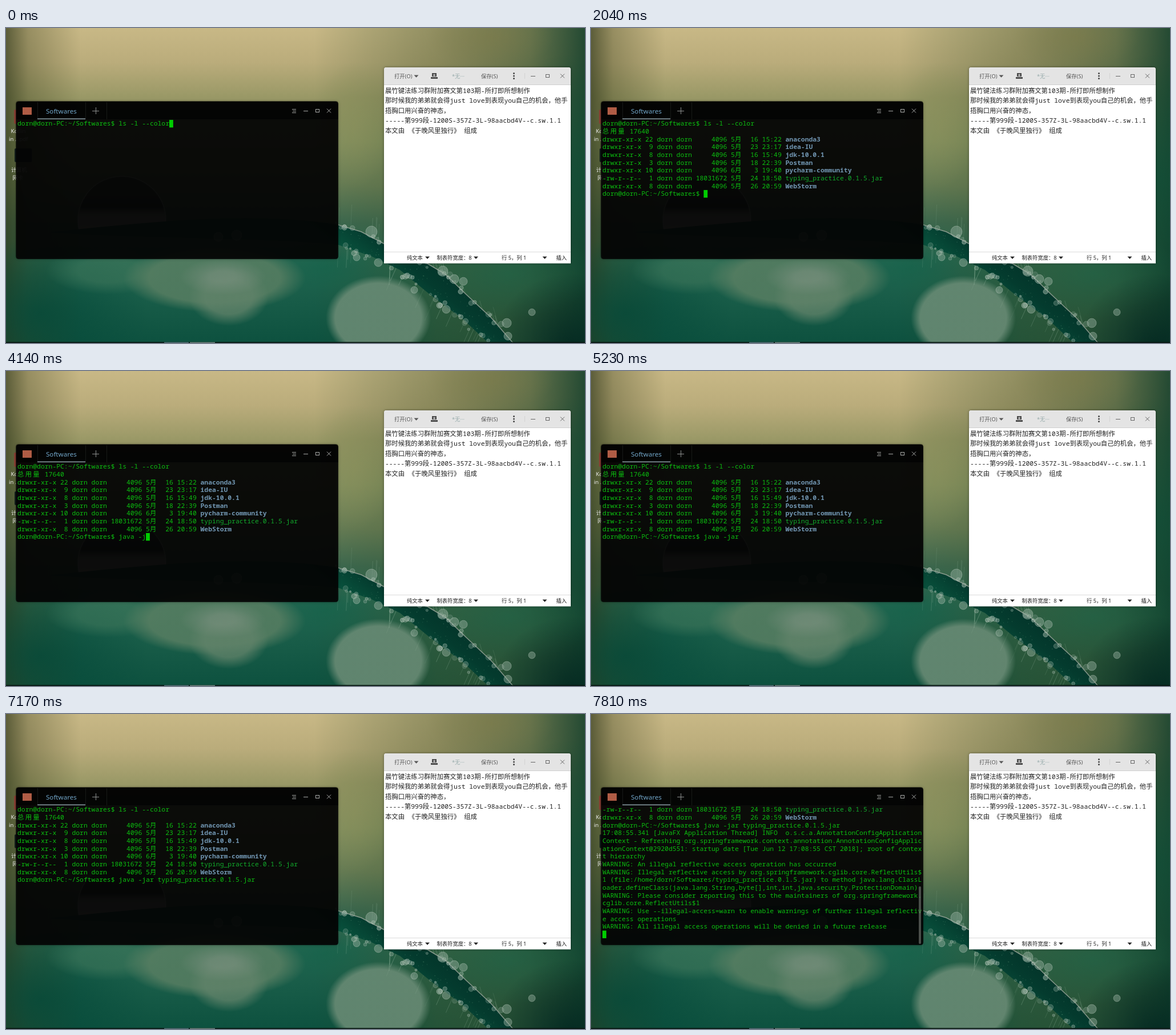
Animation of 1014 by 552 pixels, one loop 8 s. Source, as an HTML page with a canvas:

```html
<!DOCTYPE html>
<html lang="zh">
<head>
<meta charset="utf-8">
<title>Terminal session</title>
<style>
html, body { margin: 0; width: 100%; height: 100%; overflow: hidden; background: #0d503e; }
canvas { display: block; }
</style>
</head>
<body>
<canvas id="stage" width="1014" height="552"></canvas>
<script>
const W = 1014, H = 552, LOOP = 8000;
const MONO = '"Noto Sans Mono", "Noto Sans Mono CJK SC", "Noto Sans CJK SC", monospace';
const SANS = '"Noto Sans", "Noto Sans CJK SC", sans-serif';
const ctx = document.getElementById('stage').getContext('2d');
const desk = document.createElement('canvas');
desk.width = W;
desk.height = H;
const d = desk.getContext('2d');

let seed = 7;
const rnd = (a = 0, b = 1) => {
  seed = (seed * 16807) % 2147483647;
  return a + (b - a) * seed / 2147483647;
};

function ramp(x0, y0, x1, y1, stops) {
  const g = d.createLinearGradient(x0, y0, x1, y1);
  stops.forEach(([at, color]) => g.addColorStop(at, color));
  return g;
}

function rect(color, x, y, w, h) {
  d.fillStyle = color;
  d.fillRect(x, y, w, h);
}

function panel(color, x, y, w, h, radii) {
  d.fillStyle = color;
  d.beginPath();
  d.roundRect(x, y, w, h, radii);
  d.fill();
}

function line(color, width, ...p) {
  d.strokeStyle = color;
  d.lineWidth = width;
  d.beginPath();
  for (let i = 0; i < p.length; i += 4) {
    d.moveTo(p[i], p[i + 1]);
    d.lineTo(p[i + 2], p[i + 3]);
  }
  d.stroke();
}

function label(text, x, y, size, color, family = SANS, weight = 400) {
  d.font = `${weight} ${size}px ${family}`;
  d.fillStyle = color;
  d.fillText(text, x, y);
}

// Soft ellipse: solid up to `core`, then fading out
function glow(x, y, rx, ry, rgb, alpha, core = 0) {
  d.save();
  d.translate(x, y);
  d.scale(rx, ry);
  const g = d.createRadialGradient(0, 0, core, 0, 0, 1);
  g.addColorStop(0, `rgba(${rgb},${alpha})`);
  g.addColorStop(1, `rgba(${rgb},0)`);
  d.fillStyle = g;
  d.fillRect(-1, -1, 2, 2);
  d.restore();
}

// Point at fraction t of a chain of points
function along(points, t) {
  const s = t * (points.length - 1), i = Math.min(points.length - 2, Math.floor(s)), f = s - i;
  return [0, 1].map(k => points[i][k] + (points[i + 1][k] - points[i][k]) * f);
}

function bead(x, y, r, alpha) {
  d.beginPath();
  d.arc(x, y, r, 0, 7);
  d.fillStyle = `rgba(150,175,160,${alpha})`;
  d.fill();
  d.strokeStyle = `rgba(205,215,205,${alpha})`;
  d.lineWidth = 0.8;
  d.stroke();
}

function drawLeaf() {
  const top = [[582, 345], [622, 357], [662, 378], [735, 411], [770, 432], [805, 466], [850, 508], [888, 552]];
  const low = [[582, 380], [640, 400], [690, 424], [740, 465], [800, 510], [845, 552]];

  // Large drop resting on the stem
  d.beginPath();
  d.arc(203, 337, 77, Math.PI * 0.93, Math.PI * 2.07);
  d.fillStyle = ramp(0, 260, 0, 350, [[0, '#3a4837'], [0.6, '#26362a'], [0.75, '#93a092'], [1, '#a9a8a5']]);
  d.fill();
  d.strokeStyle = 'rgba(190,205,195,.55)';
  d.lineWidth = 2;
  d.stroke();

  for (let i = 0; i < 46; i++) {
    const upper = i % 2, [x, y] = along(upper ? top : low, rnd());
    const len = rnd(12, 42), dir = upper ? -1 : 1;
    line(`rgba(190,215,195,${rnd(0.08, 0.32)})`, 0.8, x, y,
      x - dir * len * (x < 680 ? 0.04 : upper ? -0.3 : 0.45), y + dir * len);
  }

  d.beginPath();
  d.moveTo(75, 358);
  d.bezierCurveTo(250, 340, 430, 320, 582, 345);
  top.forEach(p => d.lineTo(...p));
  low.slice().reverse().forEach(p => d.lineTo(...p));
  d.bezierCurveTo(450, 366, 240, 370, 75, 358);
  d.fillStyle = ramp(580, 400, 660, 300, [[0, '#0a5a42'], [0.5, '#043b2e'], [1, '#022f26']]);
  d.fill();

  for (let i = 0; i < 90; i++) {
    const t = rnd(), a = along(top, t), b = along(low, t), f = rnd();
    rect(`rgba(95,150,120,${rnd(0.1, 0.45)})`, a[0] + (b[0] - a[0]) * f, a[1] + (b[1] - a[1]) * f, 1.3, 1.3);
  }
  d.strokeStyle = 'rgba(190,190,180,.65)';
  d.lineWidth = 1.6;
  d.beginPath();
  top.forEach(p => d.lineTo(...p));
  d.stroke();
  for (let i = 0; i < 64; i++) {
    const [x, y] = along(i % 2 ? top : low, rnd());
    bead(x + rnd(-6, 6), y + rnd(-5, 6), rnd(1, 5), rnd(0.2, 0.6));
  }
  for (const [x, y, r] of [[640, 357, 10], [765, 426, 9], [785, 440, 8], [801, 444, 7], [877, 517, 8],
    [879, 540, 7], [921, 498, 6], [771, 493, 7], [715, 459, 6], [652, 411, 7], [614, 402, 6], [372, 366, 8], [404, 363, 9]])
    bead(x, y, r, 0.45);
}

function drawWallpaper() {
  rect(ramp(0, 0, 0, H, [[0, '#c8b886'], [0.11, '#baac7b'], [0.22, '#999866'], [0.36, '#889462'],
    [0.5, '#6a7f57'], [0.62, '#3c6950'], [0.74, '#226650'], [1, '#0d513f']]), 0, 0, W, H);
  rect(ramp(0, 0, 130, 0, [[0, 'rgba(50,58,28,.72)'], [0.3, 'rgba(60,65,30,.35)'], [1, 'rgba(60,65,30,0)']]), 0, 0, 130, H);
  rect(ramp(540, 0, W, 0, [[0, 'rgba(45,75,40,0)'], [0.45, 'rgba(70,85,45,.42)'], [0.8, 'rgba(50,80,48,.68)'],
    [1, 'rgba(18,62,42,.9)']]), 540, 0, W - 540, H);
  glow(985, 265, 150, 220, '14,78,56', 0.75);
  glow(850, 15, 110, 60, '125,122,72', 0.5);
  glow(610, 170, 70, 110, '140,145,92', 0.55);
  glow(60, 500, 190, 130, '4,72,56', 0.75);
  glow(560, 420, 90, 50, '20,98,74', 0.6);
  glow(180, 425, 110, 42, '62,118,90', 0.6, 0.5);
  glow(365, 438, 160, 60, '88,126,98', 0.85, 0.72);
  glow(390, 470, 70, 52, '96,130,105', 0.8, 0.6);
  glow(380, 436, 75, 32, '118,142,124', 0.65, 0.3);
  glow(652, 508, 92, 74, '104,138,116', 0.9, 0.82);
  glow(880, 430, 150, 80, '28,104,76', 0.5);
  glow(990, 560, 140, 130, '2,38,32', 0.85);
  drawLeaf();

  panel('#8a4034', 14, 143, 30, 25, 2);
  label('Kotlin', 8.5, 184, 9.5, '#eee');
  label('in ...pdf', 5, 197.5, 9.5, '#eee');
  panel('#14201c', 15, 211, 30, 24, 2);
  label('计算机', 9, 252, 9.3, '#eee');
  label('网卡', 11.5, 265.5, 9.3, '#eee');
  rect('rgba(8,22,18,.85)', 0, 550, W, 2);
  rect('#53757a', 277, 550.5, 43, 1.5);
  rect('#6d8580', 322, 550.5, 44, 1.5);
}

function windowButtons(color, min, max, close, y) {
  line(color, 1, min, y + 0.5, min + 8, y + 0.5, close, y - 3.5, close + 7, y + 3.5, close, y + 3.5, close + 7, y - 3.5);
  d.strokeRect(max + 0.5, y - 2.5, 6, 5);
}

function drawTerminal() {
  d.save();
  d.shadowColor = 'rgba(0,0,0,.4)';
  d.shadowBlur = 5;
  panel('rgba(4,4,4,.91)', 18, 129, 563.5, 275.5, 4);
  d.restore();
  panel('rgba(0,0,0,.6)', 18, 129, 563.5, 31, [4, 4, 0, 0]);
  d.strokeStyle = 'rgba(0,0,0,.55)';
  d.lineWidth = 1;
  d.beginPath();
  d.roundRect(17.5, 128.5, 564, 276, 4);
  d.stroke();
  rect('#b05c45', 29, 139, 16, 13);
  line('rgba(70,75,72,.3)', 1, 55.5, 130, 55.5, 160, 139.5, 130, 139.5, 160, 176.5, 130, 176.5, 160);
  label('Softwares', 70, 150, 11.6, '#72a7ca');
  rect('#8a9ca4', 55, 158.5, 84, 1.5);
  line('#8d908e', 1, 151, 145.5, 163, 145.5, 157.5, 139, 157.5, 151);
  line('#a9aaa8', 1, 501, 142.5, 508, 142.5, 502, 145.5, 508, 145.5, 501, 148.5, 508, 148.5);
  windowButtons('#a9aaa8', 521, 542, 562, 145);
}

function arrow(x, y, color) {
  d.fillStyle = color;
  d.beginPath();
  d.moveTo(x - 4, y - 2);
  d.lineTo(x + 4, y - 2);
  d.lineTo(x, y + 2.3);
  d.fill();
}

function drawEditor() {
  d.save();
  d.shadowColor = 'rgba(0,0,0,.4)';
  d.shadowBlur = 4;
  panel('#fff', 662, 69, 327, 343.5, [4, 4, 0, 0]);
  d.restore();
  panel('#e4e4e4', 662, 69, 327, 30.5, [4, 4, 0, 0]);
  rect('#cfcfcf', 662, 99, 327, 1);
  rect('#dadada', 662, 392, 327, 1);

  label('打开(O)', 680, 87.5, 9.3, '#555');
  arrow(718.5, 84.5, '#555');
  rect('#4b4b4b', 744, 86, 12, 3);
  rect('#4b4b4b', 746, 79, 8, 6);
  line('#e4e4e4', 1, 750, 80.5, 750, 85, 748, 82.5, 752, 82.5);
  label('*无···', 781, 87.5, 9.3, '#96aaaa');
  label('保存(S)', 832, 87.5, 9.3, '#555');
  for (const y of [79.5, 84, 88.5]) {
    d.fillStyle = '#444';
    d.beginPath();
    d.arc(889.5, y, 1.5, 0, 7);
    d.fill();
  }
  line('#d2d2d2', 1, 908.5, 79, 908.5, 89);
  windowButtons('#666', 919, 945, 971, 84);

  ['小满键法练习群附加赛文第103期-所打即所想制作'.replace('小满键法', '晨竹键法'),
    '那时候我的弟弟就会得just love到表现you自己的机会，他手',
    '捂胸口用兴奋的神态，',
    '-----第999段-1200S-357Z-3L-98aacbd4V--c.sw.1.1',
    '本文由 《于晚风里独行》 组成'
  ].forEach((text, i) => label(text, 664, 114 + i * 17.45, 11.34, '#222', MONO));

  label('纯文本', 702, 405.5, 9.3, '#222');
  arrow(738, 402.5, '#222');
  label('制表符宽度：8', 754.5, 405.5, 9.3, '#222');
  arrow(823, 402.5, '#222');
  label('行 5，列 1', 868, 405.5, 9.3, '#222');
  arrow(943.5, 402.5, '#222');
  label('插入', 963.5, 405.5, 9.3, '#111', SANS, 500);
}

// Terminal contents
const CELL = 6.82, ROW = 13.66, LEFT = 20, TOP = 161, COLS = 82, ROWS = 17;
const USER = 'dorn', JAR = 'typing_practice.0.1.5.jar';
const PROMPT = `${USER}@${USER}-PC:~/Softwares$ `;

const entry = (mode, links, size, month, day, time, name) =>
  `${mode} ${String(links).padStart(2)} ${USER} ${USER} ${String(size).padStart(8)} ${month}月  ${String(day).padStart(2)} ${time} ${name}`;
const folder = (links, ...rest) => entry('drwxr-xr-x', links, 4096, ...rest);

const listCommand = PROMPT + 'ls -l --color';
const listed = [
  listCommand,
  '总用量 17640',
  folder(22, 5, 16, '15:22', 'anaconda3'),
  folder(9, 5, 23, '23:17', 'idea-IU'),
  folder(8, 5, 16, '15:49', 'jdk-10.0.1'),
  folder(3, 5, 18, '22:39', 'Postman'),
  folder(10, 6, 3, '19:40', 'pycharm-community'),
  entry('-rw-r--r--', 1, 18031672, 5, 24, '18:50', JAR),
  folder(8, 5, 26, '20:59', 'WebStorm'),
  PROMPT
].join('\n');
const typed = n => listed + 'java -jar t'.slice(0, n);
const run = `${listed}java -jar ${JAR} `;
const started = `${run}\n17:08:55.341 [JavaFX Application Thread] INFO  o.s.c.a.AnnotationConfigApplicationContext - Refreshing org.springframework.context.annotation.AnnotationConfigApplicationContext@2920d551: startup date [Tue Jun 12 17:08:55 CST 2018]; root of context hierarchy\n`;
const warned = started + [
  'An illegal reflective access operation has occurred',
  `Illegal reflective access by org.springframework.cglib.core.ReflectUtils$1 (file:/home/${USER}/Softwares/${JAR}) to method java.lang.ClassLoader.defineClass(java.lang.String,byte[],int,int,java.security.ProtectionDomain)`,
  'Please consider reporting this to the maintainers of org.springframework.cglib.core.ReflectUtils$1',
  'Use --illegal-access=warn to enable warnings of further illegal reflective access operations',
  'All illegal access operations will be denied in a future release'
].map(text => `WARNING: ${text}\n`).join('');

// [start in ms, screen text, cursor visible]
const steps = [
  [0, listCommand, 1], [450, listCommand, 0], [850, listCommand, 1],
  [900, listed, 1], [1440, listed, 0], [2040, listed, 1], [2640, listed, 0], [2730, listed, 1],
  [2830, typed(1), 1], [2920, typed(2), 1], [3110, typed(3), 1], [3210, typed(4), 1],
  [3410, typed(5), 1], [3870, typed(6), 1], [4140, typed(7), 1], [4270, typed(8), 1],
  [4450, typed(9), 1], [4650, typed(10), 1], [5230, typed(10), 0], [5450, typed(10), 1],
  [5530, typed(11), 1], [5610, run, 1], [6180, run, 0], [6580, run, 1],
  [6630, run + '\n', 1], [7170, run + '\n', 0], [7580, started, 0], [7810, warned, 1]
];

const wrap = text => text.split('\n').flatMap(l => l.match(new RegExp(`.{1,${COLS}}`, 'g')) || ['']);

// Draws one row on the cell grid and returns the column after it
function putRow(text, row) {
  const nameAt = /^[d-]r/.test(text) ? 46 : Infinity;
  let col = 0;
  [...text].forEach((ch, i) => {
    const isName = i >= nameAt, isFolder = isName && text[0] === 'd';
    ctx.font = `${isFolder ? 700 : 400} 11.37px ${MONO}`;
    ctx.fillStyle = isFolder ? '#7196b2' : isName ? '#12ac2c' : '#0cbe10';
    ctx.fillText(ch, LEFT + col * CELL, TOP + row * ROW + 10.4);
    col += ch > '\u2fff' ? 2 : 1;
  });
  return col;
}

function draw(ms) {
  const [, text, cursor] = steps.findLast(s => s[0] <= ms);
  const rows = wrap(text), scroll = Math.max(0, rows.length - ROWS);
  ctx.drawImage(desk, 0, 0);
  let col = 0;
  rows.slice(scroll).forEach((r, i) => { col = putRow(r, i); });
  if (cursor) {
    ctx.fillStyle = '#00cd00';
    ctx.fillRect(LEFT + col * CELL, TOP + (rows.length - scroll - 1) * ROW, CELL, ROW - 0.3);
  }
  if (scroll) {
    ctx.fillStyle = 'rgba(120,125,120,.6)';
    ctx.beginPath();
    ctx.roundRect(574, 302, 4, 101, 2);
    ctx.fill();
  }
}

drawWallpaper();
drawTerminal();
drawEditor();

const began = performance.now();
function tick() {
  draw((performance.now() - began) % LOOP);
  requestAnimationFrame(tick);
}
tick();
</script>
</body>
</html>
```
